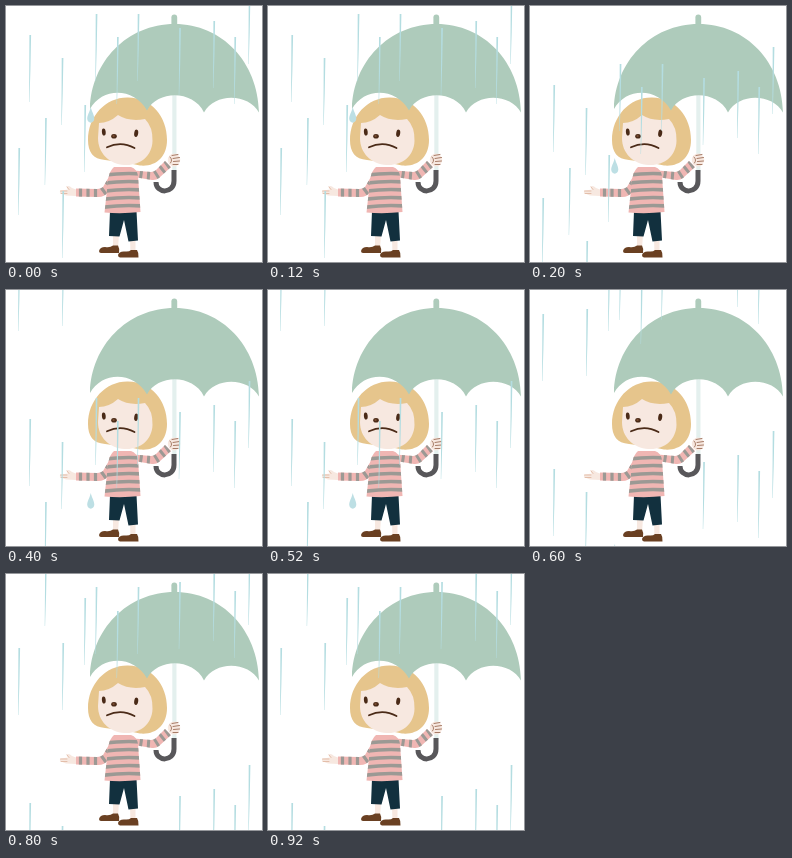
These frames come from a looping animation (256 by 256 pixels, 1 s). An HTML page with a canvas:

```html
<!DOCTYPE html>
<html lang="en">
<head>
<meta charset="utf-8">
<title>Rainy day</title>
<style>
html, body { margin: 0; width: 100%; height: 100%; overflow: hidden; background: #fff; }
canvas { display: block; width: 100vw; height: 100vh; }
</style>
</head>
<body>
<canvas id="stage"></canvas>
<script>
const SIZE = 256, STEP = 200, STEPS = 5, FALL = 50;
const canvas = document.getElementById('stage');
const ctx = canvas.getContext('2d');

const SKIN = '#f7e8e0', HAIR = '#e6c58c', BROWN = '#4a2a17', PINK = '#f0b6b3',
      GREY = '#9b9994', NAVY = '#12303e', SHOE = '#6a4022', GREEN = '#aecbbb',
      RAIN = '#b4dde1';

// x, first step, top at that step, last step
const streaks = [
  [13, 0, 142, 1], [13, 2, -26, 4],
  [24, 0, 29, 4],
  [39.7, 0, 112, 2], [39.7, 4, -15, 4],
  [56.3, 0, 52, 4],
  [57, 0, 185, 1], [57, 2, -31, 4],
  [79, 0, 99, 1], [79, 3, -26, 4],
  [90.3, 0, 8, 2], [90.3, 3, -37, 4],
  [111.6, 0, 31, 2], [111.6, 3, -13, 4],
  [132.3, 0, 8, 2], [132.3, 3, -37, 4],
  [173.8, 0, 22, 4], [173.8, 4, 8, 4],
  [208, 0, 15, 4], [208, 3, -50, 4],
  [229, 0, 31, 4], [229, 3, -33, 4],
  [243.3, 0, -9, 4], [243.3, 4, -16, 4]
];

function fill(color, d) {
  ctx.fillStyle = color;
  ctx.fill(new Path2D(d));
}

function line(color, width, d, cap = 'round') {
  ctx.strokeStyle = color;
  ctx.lineWidth = width;
  ctx.lineCap = cap;
  ctx.lineJoin = 'round';
  ctx.stroke(new Path2D(d));
}

function oval(color, x, y, rx, ry, turn = 0) {
  ctx.fillStyle = color;
  ctx.beginPath();
  ctx.ellipse(x, y, rx, ry, turn, 0, Math.PI * 2);
  ctx.fill();
}

function knit(shape, stripes, width) {
  fill(PINK, shape);
  ctx.save();
  ctx.clip(new Path2D(shape));
  stripes.forEach(d => line(GREY, width, d, 'butt'));
  ctx.restore();
}

function legs() {
  fill(SKIN, 'M107 228H113L112 243H107Z M124 232H129.5V248H124.5Z');
  fill(SHOE, 'M93 245Q94 241 99 241Q104 242 107 239.5H112Q114 243 113 247H95Q93 247 93 245Z');
  fill(SHOE, 'M112 249Q113 245 119 245.5Q123 246 125 244H131Q133 247 132.5 251.5H114Q112 251 112 249Z');
  fill(NAVY, 'M104 205H130.5L132 234.5L122.5 235.5L118 214L113.5 230.5L103 230Z');
}

function sweater() {
  knit('M107 164L97 181Q95 183 91 183L70 182.5V190.5L92 191Q99 191 102 186L113 171Z',
    ['M74.5 180V193', 'M82 180V193', 'M89.5 180V193', 'M94 180L102 191', 'M98 175L108 182', 'M102 168L113 174'], 3.2);
  knit('M122 164L145 166Q148 166 150 164L159 155L165 161L153 172Q150 174.5 146 174L122 170Z',
    ['M136 162L134 176', 'M143 162L142 177', 'M147 163L154 174', 'M152 158L160 168', 'M157 153L165 164'], 3);
  const rows = [];
  for (let y = 168; y < 207; y += 8) rows.push(`M95 ${y + 1.5}Q116 ${y - 1.5} 137 ${y}`);
  knit('M108 161H125Q131 163 132 170L134.5 206Q116 208 98.5 206.5L102 175Q103 165 108 161Z', rows, 3.6);
}

function head() {
  fill(HAIR, 'M122 91.5C100 91 82 110 82 134C82 146 87 153 99 154L122 157L134 159.5C150 161 161 151 161 134C161 111 146 92 122 91.5Z');
  fill(SKIN, 'M93 117Q103 117 112 109Q123 116 139 113Q147 121 146.5 135C146 150 134 160 118.5 159C103 158 92 147 92 132Z');
  oval(BROWN, 97.8, 126, 1.9, 3.6, -0.1);
  oval(BROWN, 130.2, 127.3, 2, 3.7, 0.15);
  oval(BROWN, 108, 130.3, 2.8, 2.3);
  oval('#8c5a3b', 107.6, 130, 1.2, 0.8);
  line(BROWN, 1.8, 'M101 141.3Q115 134.5 128.5 142');
}

function umbrella() {
  fill('#e4f0ee', 'M166.3 86H170.5V166H166.3Z');
  line(GREEN, 5.8, 'M168.3 11.5V24');
  fill(GREEN, 'M84 103C85 56 121 18 168.5 18C216 18 252 56 253 106.5C243 87.5 209 86 198 106.5C187 84 152 84 141 104.5C128 81 96 81 84 103Z');
  line('#58575a', 5, 'M168 164V175C168 188 150 188 150 176', 'butt');
}

function hands() {
  fill(SKIN, 'M70 183.5L66 182Q63 179 60.5 180.5L62 183.5L55 184.5Q52.5 186 55 187.5L60 189.5L70 190Z');
  line('#dfb49c', 0.8, 'M61 181L63 183.5 M54.5 185H61 M55 187.5H61');
  oval(SKIN, 168, 154, 6.2, 6.5);
  line('#9d705a', 0.9, 'M166 149.5L172 148.5 M167 152.5L173.5 151.5 M167.5 155.5L173.5 155 M167 158.5L172 158.5 M164 151Q167 154 164.5 157');
}

function streak(x, y) {
  fill(RAIN, `M${x - 0.6} ${y}H${x + 1.1}L${x + 0.4} ${y + 35}L${x - 0.6} ${y + 67}H${x - 1}L${x - 0.7} ${y + 30}Z`);
}

function drop(y) {
  fill('#bddfe4', `M84.7 ${y}C86 ${y + 5} 88.3 ${y + 8} 88.3 ${y + 11.5}C88.3 ${y + 17} 81.2 ${y + 17} 81.2 ${y + 11.5}C81.2 ${y + 8} 83.7 ${y + 5} 84.7 ${y}Z`);
}

function draw(step) {
  const w = innerWidth, h = innerHeight, dpr = devicePixelRatio || 1;
  const pw = Math.round(w * dpr), ph = Math.round(h * dpr);
  if (canvas.width !== pw || canvas.height !== ph) {
    canvas.width = pw;
    canvas.height = ph;
  }
  ctx.setTransform(pw / SIZE, 0, 0, ph / SIZE, 0, 0);
  ctx.fillStyle = '#fff';
  ctx.fillRect(0, 0, SIZE, SIZE);

  legs();
  sweater();
  head();
  umbrella();
  hands();

  for (const [x, first, top, last] of streaks) {
    if (step >= first && step <= last) streak(x, top + FALL * (step - first));
  }
  drop(101 + 51 * step);
}

function tick() {
  draw(Math.floor(performance.now() / STEP) % STEPS);
  requestAnimationFrame(tick);
}
tick();
</script>
</body>
</html>
```
